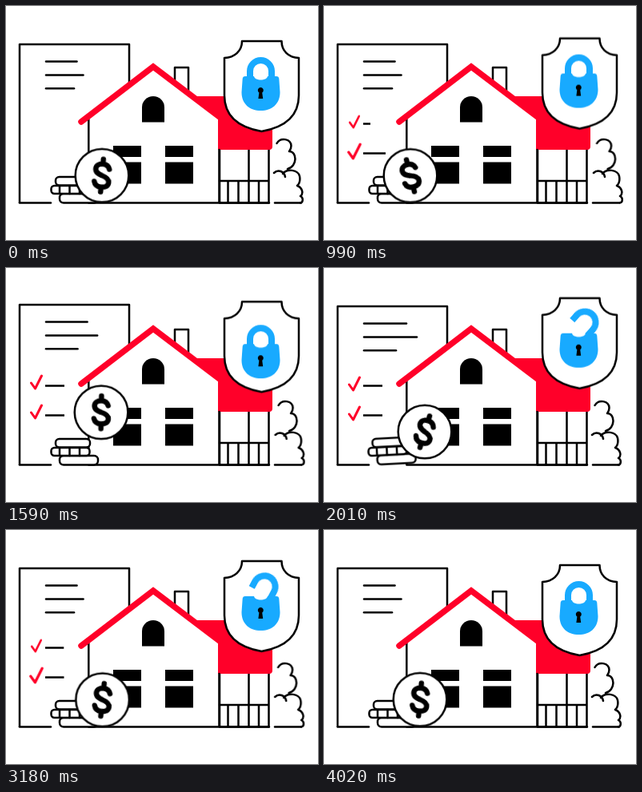
An HTML page that plays this animation: 390 by 293 pixels, repeating every 4.05 s.

```html
<!DOCTYPE html>
<html lang="en">
<head>
<meta charset="utf-8">
<title>Protected home</title>
<style>
  html, body { margin: 0; width: 100%; height: 100%; overflow: hidden; background: #fff; }
  svg { display: block; width: 390px; height: 293px; }
  :root { --sine: cubic-bezier(.37, 0, .63, 1); }

  .ink { fill: #fff; stroke: #000; stroke-width: 2.5; stroke-linejoin: round; stroke-linecap: round; }
  .bare { fill: none; }
  .red { fill: #ff0029; }
  .blue { fill: #18aaff; }
  .tick { fill: none; stroke: #ff0029; stroke-width: 3; stroke-linecap: round; stroke-linejoin: round; transform-box: fill-box; transform-origin: center; }

  .move { animation: 4050ms var(--sine) infinite; }
  #shield { animation: float 675ms var(--sine) infinite alternate; }
  @keyframes float { to { transform: translateY(-6.3px); } }

  .bush { animation-name: sway; }
  @keyframes sway {
    0%, 16.667%, 33.333%, 50%, 66.667%, 83.333%, 100% { transform: none; }
    8.333%, 25%, 41.667%, 58.333%, 75% { transform: translateX(var(--sway)); }
  }

  #page { animation-name: hop; }
  @keyframes hop {
    0%, 32% { transform: none; }
    39.3% { transform: translateY(-2px); }
    47%, 100% { transform: none; }
  }

  .text { stroke-dasharray: var(--len) 200; animation-name: write; }
  @keyframes write {
    0%, 26.5% { stroke-dashoffset: var(--cut); }
    42.5%, 67% { stroke-dashoffset: 0; }
    79%, 100% { stroke-dashoffset: var(--cut); }
  }
  .item { stroke-linecap: butt; stroke-dasharray: 28 200; }
  #item1 { animation-name: item1; }
  #item2 { animation-name: item2; }
  @keyframes item1 {
    0%, 23% { stroke-dashoffset: 29; }
    24.44% { stroke-dashoffset: 19; }
    27.5% { stroke-dashoffset: 0; }
    31%, 78% { stroke-dashoffset: 4; }
    83%, 100% { stroke-dashoffset: 29; }
  }
  @keyframes item2 {
    0%, 20% { stroke-dashoffset: 29; }
    24.44% { stroke-dashoffset: 0; }
    28%, 78% { stroke-dashoffset: 4; }
    84%, 100% { stroke-dashoffset: 29; }
  }
  #tick1 { animation-name: tick1; }
  #tick2 { animation-name: tick2; }
  @keyframes tick1 {
    0%, 21.5% { transform: scale(0); }
    24.44% { transform: scale(.88); }
    26.5% { transform: scale(1.12); }
    29%, 74% { transform: none; }
    76.5% { transform: scale(1.1); }
    78.52% { transform: scale(.88); }
    81%, 100% { transform: scale(0); }
  }
  @keyframes tick2 {
    0%, 18.5% { transform: scale(0); }
    24.44% { transform: scale(1.1); }
    27.5%, 75% { transform: none; }
    78.52% { transform: scale(1.1); }
    84%, 100% { transform: scale(0); }
  }

  #coinX { animation-name: slide; }
  #coinY { animation-name: jump; }
  #dollar { animation-name: roll; }
  @keyframes slide {
    0%, 100% { transform: translateX(120px); }
    9.88% { transform: translateX(119px); }
    24.44%, 29.63% { transform: translateX(108px); animation-timing-function: ease-in; }
    39.26% { transform: translateX(119px); animation-timing-function: ease-out; }
    49.63% { transform: translateX(126px); }
    60.5% { transform: translateX(118px); }
    65.93% { transform: translateX(119px); }
    78.52% { transform: translateX(120.6px); }
  }
  @keyframes jump {
    0%, 100% { transform: translateY(212.3px); }
    24.44%, 30% { transform: translateY(212.5px); animation-timing-function: ease-out; }
    39.26% { transform: translateY(180.7px); animation-timing-function: ease-in; }
    49.63% { transform: translateY(205px); animation-timing-function: linear; }
    51.5%, 66% { transform: translateY(212.8px); }
  }
  @keyframes roll {
    0%, 100% { transform: rotate(5deg); }
    9.88% { transform: rotate(4deg); }
    24.44%, 29.63% { transform: rotate(-14deg); animation-timing-function: ease-in; }
    39.26% { transform: rotate(1deg); animation-timing-function: ease-out; }
    49.63% { transform: rotate(17deg); }
    60.5% { transform: rotate(1deg); }
    65.93% { transform: rotate(3deg); }
    78.52% { transform: rotate(6deg); }
  }
  #stack { transform-origin: 62px 247px; animation-name: tilt; }
  @keyframes tilt {
    0%, 45% { transform: none; }
    49.63% { transform: rotate(-3deg); }
    55% { transform: rotate(-4deg); }
    60%, 100% { transform: none; }
  }

  #lock { animation-name: dip; }
  @keyframes dip {
    0%, 33% { transform: none; }
    39.26% { transform: translateY(9px); }
    44% { transform: translateY(-2px); }
    48%, 100% { transform: none; }
  }
  #shackle { transform-origin: 332px 88px; animation-name: open; }
  @keyframes open {
    0%, 39.5% { transform: none; }
    48.5%, 49.63% { transform: rotate(41deg); }
    56% { transform: rotate(24deg); }
    62%, 79% { transform: rotate(28deg); }
    87%, 100% { transform: none; }
  }
</style>
</head>
<body>
<svg viewBox="0 0 390 293">
  <clipPath id="above"><rect width="390" height="247"/></clipPath>

  <!-- checklist -->
  <g clip-path="url(#above)">
    <g id="page" class="move">
      <path class="ink" d="M17 255V48H154V255"/>
      <path class="ink bare text move" style="--len:53;--cut:14.5" d="M50 69.400h53"/>
      <path class="ink bare text move" style="--len:66;--cut:19.500" d="M50 86.400h66"/>
      <path class="ink bare text move" style="--len:40;--cut:5" d="M50 103.200h40"/>
      <path id="tick1" class="tick move" d="M31.500 146l5 7 8-16"/>
      <path id="tick2" class="tick move" d="M31.500 183l5 7 8-16"/>
    </g>
  </g>
  <path id="item1" class="ink bare item move" d="M49 147.500h28"/>
  <path id="item2" class="ink bare item move" d="M49 184.500h28"/>
  <path class="ink" d="M17 246.500H56"/>

  <!-- bushes -->
  <path class="ink bush move" style="--sway:2.6px" d="M338.500 172C343 164 356 166 356.500 175Q356.500 179 354 182C364 182 364.500 201 352 204"/>
  <path class="ink bush move" style="--sway:2px" d="M335 209C340 204 348 207 349 214M346 210C351 203 365 205 367 213Q368.500 221 364 225C371 228 372 235 368 238C372 240 371.500 246 368 246.500"/>
  <path class="ink" d="M336 246.500H369"/>

  <!-- house -->
  <rect class="ink" x="211" y="77" width="17" height="45"/>
  <path class="ink" d="M267 178H328.500V246.500H267ZM303.500 178V246.500M267 219H328.500M277.500 219V246.500M290.500 219V246.500M316 219V246.500"/>
  <path class="red" d="M236 113H322Q333 120 333 146V176Q333 180 329 180H265V138Z"/>
  <path fill="#fff" d="M103 139L184 78L265 140V246H103Z"/>
  <path class="ink bare" d="M103.300 140V246.500H329M266.500 180V246"/>
  <path d="M94 145L184 76L267 139" fill="none" stroke="#ff0029" stroke-width="7.500" stroke-linecap="round"/>
  <path d="M170 145.500V127a14 14 0 0 1 28 0V145.500Z"/>
  <path d="M134 175h35v14h-35ZM134 195.500h35v27h-35ZM199 175h35v14h-35ZM199 195.500h35v27h-35Z"/>

  <!-- coins -->
  <g id="stack" class="move">
    <rect class="ink" x="67" y="235" width="48" height="11.500" rx="5"/>
    <rect class="ink" x="56.500" y="225" width="48" height="10" rx="4"/>
    <path class="ink" d="M67 225V235M79.500 225V235M92 225V235"/>
    <rect class="ink" x="62" y="214" width="43" height="10.500" rx="4.500"/>
  </g>
  <g id="coinX" class="move"><g id="coinY" class="move">
    <circle class="ink" r="33.300"/>
    <path id="dollar" class="move" fill="none" stroke="#000" stroke-width="6.500" stroke-linecap="round" d="M8.500-8.500C7-13 4-14.500 0-14.500C-5-14.500-8.500-12-8.500-8C-8.500-3-4-1.500 0 0C5 1.500 9 3.500 9 8C9 12.500 5 14.500 0 14.500C-5 14.500-8 12-9 8M0-20.500V-15M0 15V20.500"/>
  </g></g>

  <!-- shield and padlock -->
  <g id="shield">
    <path class="ink" d="M295 44H344.500C344.500 56 353 64.500 366 65V112C366 142 342 153 319.500 157C297 153 273 142 273 112V65C286 64.500 295 56 295 44Z"/>
    <g id="lock" class="move">
      <path id="shackle" class="move" fill="none" stroke="#18aaff" stroke-width="8" d="M305 90V81.500a13.500 13.500 0 0 1 27 0V92"/>
      <path class="blue" d="M299 88H310C311 94 326 94 327 88H338Q341 88 341.300 91L342.500 108C342.500 123 332 131 318.500 131S294.500 123 294.500 108L295.700 91Q296 88 299 88Z"/>
      <path d="M316.400 108.500a3.500 3.500 0 1 1 3.800 0L321.200 116H315.400Z"/>
    </g>
  </g>
</svg>
</body>
</html>
```
